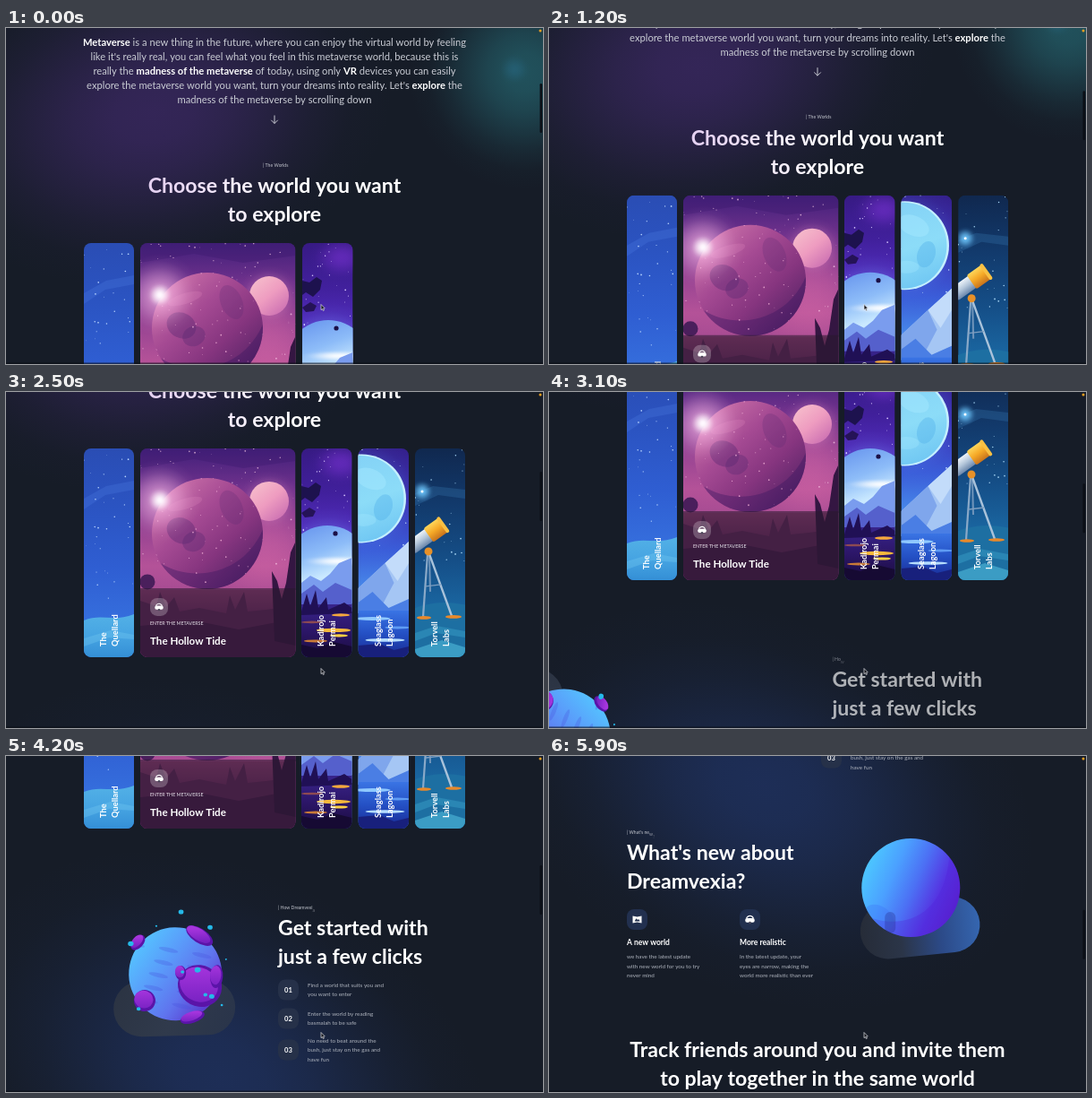
These frames come from a looping animation (600x375 px, 6000 ms). An HTML page with a canvas:

```html
<!DOCTYPE html>
<html lang="en">
<head>
<meta charset="utf-8">
<title>Scrolling worlds page</title>
<style>
html, body { margin: 0; width: 100%; height: 100%; overflow: hidden; background: #161c27; }
canvas { display: block; width: 600px; height: 375px; }
</style>
</head>
<body>
<canvas id="stage"></canvas>
<script>
const W = 600, H = 375, LOOP = 6000, STEP = 100, TAU = Math.PI * 2;
const canvas = document.getElementById('stage');
const c = canvas.getContext('2d');
const dpr = window.devicePixelRatio || 1;
canvas.width = W * dpr;
canvas.height = H * dpr;

// timing

const clamp = v => Math.max(0, Math.min(1, v));
const easeOut = p => 1 - Math.pow(1 - clamp(p), 1.6);

function spring(seconds, omega, zeta) {
  if (seconds <= 0) return 0;
  const wd = omega * Math.sqrt(1 - zeta * zeta), a = wd * seconds;
  return 1 - Math.exp(-zeta * omega * seconds) * (Math.cos(a) + zeta * omega / wd * Math.sin(a));
}

const scrollKeys = [[0, 0], [1200, 53.3], [2000, 112], [3100, 263], [4200, 392], [5000, 559], [5900, 718], [6000, 735]];

function scrollAt(t) {
  const k = scrollKeys;
  const slope = i => (k[i + 1][1] - k[i][1]) / (k[i + 1][0] - k[i][0]);
  const tangent = i => i === 0 ? slope(0) : i === k.length - 1 ? slope(i - 1) : (slope(i - 1) + slope(i)) / 2;
  let i = 0;
  while (i < k.length - 2 && t >= k[i + 1][0]) i++;
  const d = k[i + 1][0] - k[i][0], u = (t - k[i][0]) / d, v = 1 - u;
  return v * v * (1 + 2 * u) * k[i][1] + u * u * (3 - 2 * u) * k[i + 1][1]
    + d * u * v * (v * tangent(i) - u * tangent(i + 1));
}

// drawing helpers

function group(x, y, alpha, draw) {
  if (alpha <= 0) return;
  c.save();
  c.translate(x, y);
  c.globalAlpha *= clamp(alpha);
  draw();
  c.restore();
}

function insideDisc(x, y, r, draw) {
  c.save();
  c.beginPath();
  c.arc(x, y, r, 0, TAU);
  c.clip();
  draw();
  c.restore();
}

function ramp(x0, y0, x1, y1, ...colors) {
  const g = c.createLinearGradient(x0, y0, x1, y1);
  colors.forEach((color, i) => g.addColorStop(i / (colors.length - 1), color));
  return g;
}

function shape(fill, build) {
  c.beginPath();
  build();
  c.fillStyle = fill;
  c.fill();
}
const disc = (x, y, r, fill) => shape(fill, () => c.arc(x, y, r, 0, TAU));
const oval = (x, y, rx, ry, fill, turn = 0) => shape(fill, () => c.ellipse(x, y, rx, ry, turn, 0, TAU));
const box = (x, y, w, h, r, fill) => shape(fill, () => c.roundRect(x, y, w, h, r));
const poly = (fill, ...p) => shape(fill, () => {
  for (let i = 0; i < p.length; i += 2) c.lineTo(p[i], p[i + 1]);
  c.closePath();
});

function line(width, color, ...p) {
  c.beginPath();
  for (let i = 0; i < p.length; i += 2) c.lineTo(p[i], p[i + 1]);
  c.lineWidth = width;
  c.strokeStyle = color;
  c.stroke();
}

function glow(x, y, rx, ry, rgb, alpha, turn = 0) {
  c.save();
  c.translate(x, y);
  c.rotate(turn);
  c.scale(rx, ry);
  const g = c.createRadialGradient(0, 0, 0, 0, 0, 1);
  for (let i = 0; i <= 6; i++) {
    g.addColorStop(i / 6, `rgba(${rgb},${alpha * (1 + Math.cos(Math.PI * i / 6)) / 2})`);
  }
  disc(0, 0, 1, g);
  c.restore();
}

function stars(seed, count, w, h, color) {
  const rnd = () => (seed = (seed * 16807) % 2147483647) / 2147483647;
  for (let i = 0; i < count; i++) disc(rnd() * w, rnd() * h, 0.3 + rnd() * 0.6, color);
}

function font(size, weight) { c.font = `${weight} ${size}px Lato, sans-serif`; }

// y is the visual middle of the line
function text(str, x, y, size, weight = 400, color = '#fff', align = 'left') {
  font(size, weight);
  c.textAlign = align;
  c.fillStyle = color;
  c.fillText(str, x, y + size * 0.34);
}

// words between asterisks are bold
function richCentered(str, x, y, size, color) {
  const parts = str.split('*').map((s, i) => {
    font(size, i % 2 ? 700 : 400);
    return [s, i % 2, c.measureText(s).width];
  });
  let left = x - parts.reduce((sum, p) => sum + p[2], 0) / 2;
  for (const [s, bold, width] of parts) {
    text(s, left, y, size, bold ? 700 : 400, bold ? '#fff' : color);
    left += width;
  }
}

function typed(str, x, y, t, start) {
  [...str].forEach((ch, i) => {
    const e = Math.pow(clamp((t - start - 100 * i) / 300), 1.7);
    font(5.1, 400);
    const dx = c.measureText(str.slice(0, i)).width;
    group(x + dx, y + 7 * (1 - e), e, () => text(ch, 0, 0, 5.1, 400, '#c3c6ce'));
  });
}

const title = (lines, x, y, align, color) =>
  lines.forEach((s, i) => text(s, x, y + 32.2 * i, 23.1, 700, color, align));

function headset(x, y, s) {
  group(x, y, 1, () => {
    c.scale(s, s);
    c.beginPath();
    c.arc(0, 0, 4.3, Math.PI * 1.1, Math.PI * 1.9);
    c.lineWidth = 1.3;
    c.strokeStyle = '#fff';
    c.stroke();
    box(-5.5, -1.6, 11, 5, 2, '#fff');
    disc(0, 3.8, 1.4, '#4a4658');
  });
}

function pictureIcon(x, y) {
  poly('#fff', x - 5, y - 4, x, y - 3, x + 5, y - 4, x + 5, y + 4, x, y + 3, x - 5, y + 4);
  poly('#22304f', x - 3, y + 2, x - 1, y - 1.2, x + 0.5, y + 0.6, x + 1.6, y - 0.4, x + 3.2, y + 2);
}

// cards, 233 high

function snowCard(w) {
  box(0, 0, w, 233, 0, ramp(0, 0, 0, 200, '#2a4db4', '#2b54c2', '#2f5ed2', '#3670de'));
  poly('rgba(90,140,240,.2)', 0, 56, 25, 42, w, 36, w, 46, 24, 52, 0, 68);
  stars(31, 30, w, 170, '#b9d6ff');
  shape(ramp(0, 186, 0, 233, '#52b0e6', '#46a4e2', '#348fd6'), () => {
    c.moveTo(0, 192);
    c.bezierCurveTo(18, 184, 34, 194, w, 185);
    c.lineTo(w, 233);
    c.lineTo(0, 233);
  });
  poly('rgba(115,200,240,.35)', 0, 212, 30, 203, w, 208, w, 213, 28, 211, 0, 221);
}

function planetCard(w) {
  box(0, 0, w, 233, 0, ramp(0, 0, 0, 175, '#41207a', '#6f318c', '#944292', '#b45298', '#a04890'));
  poly('rgba(60,25,110,.4)', 0, 0, w, 0, w, 14, 115, 22, 60, 12, 0, 22);
  glow(140, 110, 70, 80, '225,110,170', 0.4);
  stars(77, 90, w, 150, 'rgba(255,210,235,.7)');
  glow(144, 59, 34, 34, '255,170,210', 0.5);
  disc(144, 59, 22, ramp(128, 40, 160, 78, '#f6bccb', '#ee9cc0', '#cc70b2'));
  disc(75, 95, 62, ramp(30, 50, 118, 144, '#c66ca6', '#a54a93', '#86357f', '#592468'));
  insideDisc(75, 95, 62, () => {
    oval(46, 92, 17, 14, 'rgba(85,38,112,.38)', 0.5);
    oval(60, 104, 13, 11, 'rgba(85,38,112,.34)', -0.4);
    oval(102, 66, 12, 20, 'rgba(85,38,112,.22)', -0.4);
    oval(50, 62, 20, 6, 'rgba(235,150,200,.18)', -0.3);
    shape('rgba(55,22,95,.38)', () => {
      c.arc(75, 95, 63, -0.1, 2.6);
      c.bezierCurveTo(60, 152, 118, 140, 138, 88);
    });
    stars(9, 60, 138, 150, 'rgba(255,190,225,.7)');
  });
  glow(22, 58, 46, 46, '255,190,235', 0.65);
  glow(22, 58, 15, 15, '255,250,255', 1);
  disc(8, 149, 8.5, '#4a1f5c');
  box(0, 158, w, 75, 0, ramp(0, 158, 0, 233, '#a04482', '#6d2a66', '#4a1d52'));
  poly('#672a62', 0, 233, 0, 170, 18, 176, 22, 160, 29, 177, 38, 166, 44, 182, 66, 178, 96, 184,
    100, 164, 106, 180, 116, 160, 120, 182, 140, 180, w, 176, w, 233);
  poly('#4a1c50', 0, 198, 60, 192, 110, 202, w, 190, w, 233, 0, 233);
  poly('#341642', 150, 215, 149, 190, 147, 137, 153, 148, 158, 168, 163, 150, 168, 116, w, 104, w, 220);
  box(0, 156, w, 77, 0, 'rgba(40,25,45,.55)');
  box(11, 167, 20, 20, 8, 'rgba(255,255,255,.24)');
  headset(21, 177, 0.85);
  text('ENTER THE METAVERSE', 11, 195.5, 5.3, 400, '#e9e3ec');
  text('The Hollow Tide', 11, 215, 11.6, 700);
}

function lavaCard(w) {
  box(0, 0, w, 233, 0, ramp(0, 0, 0, 150, '#371a84', '#41209c', '#5430c4', '#4f62de'));
  glow(44, 16, 36, 26, '120,50,210', 0.6);
  stars(53, 35, w, 110, '#d9c8ff');
  glow(30, 128, 60, 62, '120,170,255', 0.7);
  disc(29, 134, 48, ramp(5, 92, 34, 170, '#6f9df0', '#8dbcf8', '#cbeaff', '#86b4f4'));
  poly('#1d124e', 0, 42, 8, 44, 16, 38, 22, 42, 20, 52, 12, 60, 4, 55, 0, 58);
  poly('#251357', 0, 72, 9, 66, 16, 70, 13, 76, 4, 77);
  disc(38, 95, 2.6, '#1b1047');
  glow(42, 126, 44, 7, '255,255,255', 0.9);
  poly('#7a9cee', 0, 150, 10, 142, 22, 148, 32, 140, 42, 128, w, 122, w, 182, 0, 182);
  poly('#5560cc', 0, 162, 14, 152, 24, 160, 38, 150, w, 158, w, 182, 0, 182);
  box(0, 174, w, 59, 0, ramp(0, 174, 0, 233, '#38248c', '#2c1668', '#1a0c40'));
  poly('#201055', 0, 182, 6, 162, 10, 176, 16, 158, 19, 178, 28, 166, 30, 180, 48, 172, w, 178, w, 184, 0, 186);
  oval(44, 186, 10, 1.7, '#f4a83c');
  oval(12, 194, 12, 1.3, '#8d4a52');
  oval(36, 203, 19, 2.2, '#f7b93c');
  oval(42, 209, 10, 1.6, '#ffd143');
  oval(16, 215, 13, 1.5, '#c97a38');
  poly('#160a33', 0, 219, 18, 223, 36, 216, w, 221, w, 233, 0, 233);
}

function iceCard(w) {
  box(0, 0, w, 233, 0, ramp(0, 0, 0, 170, '#34208c', '#3a2cae', '#3a5cd8', '#4c98f0'));
  stars(19, 22, w, 120, '#cfe6ff');
  glow(4, 56, 72, 72, '90,150,255', 0.6);
  disc(4, 56, 49.5, '#c5f0ff');
  disc(3, 56, 48, ramp(0, 8, 36, 104, '#84d2f6', '#8cdcf8', '#6cc4f2'));
  insideDisc(3, 56, 48, () => {
    oval(14, 34, 18, 11, 'rgba(170,235,255,.4)', 0.4);
    oval(28, 66, 10, 15, 'rgba(80,175,232,.4)', 0.3);
    oval(6, 80, 14, 7, 'rgba(170,235,255,.3)');
  });
  poly('#a5c6f4', 0, 156, 30, 128, w, 104, w, 184, 0, 184);
  poly('#7fa6ec', 0, 156, 30, 128, 40, 150, 22, 184, 0, 184);
  poly('#c3dcfa', 30, 128, w, 104, w, 128, 44, 148);
  poly('#4a7ee4', 0, 172, 16, 160, 34, 178, w, 168, w, 190, 0, 190);
  box(0, 181, w, 52, 0, ramp(0, 181, 0, 233, '#3a74e4', '#2450c4', '#182a94'));
  oval(16, 190, 20, 2, '#8fc9ff');
  oval(44, 200, 14, 1.5, '#5f9cf4');
  oval(30, 214, 22, 1.8, '#b4dcff');
  poly('#18207c', 0, 220, 24, 218, 40, 225, w, 221, w, 233, 0, 233);
}

function telescopeCard(w) {
  box(0, 0, w, 233, 0, ramp(0, 0, 0, 190, '#10284f', '#123a6c', '#154f88', '#1b6ba6'));
  poly('rgba(60,130,190,.25)', 0, 50, 20, 42, w, 46, w, 56, 26, 52, 0, 64);
  stars(41, 24, w, 140, '#a5d4f4');
  glow(8, 48, 13, 13, '110,200,255', 0.9);
  disc(8, 48, 1.5, '#fff');
  oval(34, 216, 66, 44, '#1d6fa2');
  poly('#2a86b4', 0, 206, 24, 198, w, 204, w, 211, 24, 206, 0, 215);
  poly('#3b9cc4', 0, 224, 30, 214, w, 222, w, 233, 0, 233);
  line(2, '#6f94ba', 16, 118, 17, 160);
  line(2.2, '#8aa9c8', 14, 118, 9, 188);
  line(2.4, '#a9c2da', 16, 118, 41, 187);
  line(1.3, '#7f9fc0', 12, 154, 29, 152);
  oval(10, 189, 8, 1.8, '#e8892b');
  oval(43, 188, 9, 1.8, '#e8892b');
  disc(15, 115, 4.5, '#e69028');
  group(15, 97, 1, () => {
    c.rotate(-0.62);
    box(-24, -8, 26, 16, 2, ramp(0, -8, 0, 8, '#eef4fa', '#b3c6da', '#6b87ab'));
    box(0, -9.5, 20, 19, 2, ramp(0, -9.5, 0, 9.5, '#ffd65a', '#f5a826', '#c8731d'));
    box(18, -10.5, 4, 21, 2, '#f9c043');
  });
}

const cards = [
  { x: 87, w: 56, art: snowCard, label: ['The', 'Quellard'] },
  { x: 150, w: 173.5, art: planetCard },
  { x: 330, w: 56.5, art: lavaCard, label: ['Kadirojo', 'Permai'] },
  { x: 393.5, w: 56.5, art: iceCard, label: ['Seaglass', 'Lagoon'] },
  { x: 457, w: 56, art: telescopeCard, label: ['Torvell', 'Labs'] }
];

function drawCards(t) {
  cards.forEach(({ x, w, art, label }, i) => {
    const p = spring((t - 120 - 500 * (i - 3)) / 1000, 12.5, 0.75);
    group(x - 36 * (1 - p), 240, p, () => {
      c.beginPath();
      c.roundRect(0, 0, w, 233, 8);
      c.clip();
      art(w);
      if (!label) return;
      label.forEach((s, n) => group(22 + 13 * n, 221, 1, () => {
        c.rotate(-Math.PI / 2);
        text(s, 0, 0, 9.3, 700);
      }));
    });
  });
}

// floating planets, drawn around their pivot

function craterPlanet() {
  c.translate(11, 0);
  box(-70, 7, 136, 62, 31, ramp(-70, 10, 66, 68, '#2b3342', '#303a4c', '#29344a'));
  disc(0, 0, 52, ramp(-44, -30, 40, 38, '#55c2ff', '#5a9cfa', '#5f74ee', '#5a35cc'));
  insideDisc(0, 0, 52, () => {
    for (let i = 0; i < 12; i++) {
      oval(-44 + (i * 37) % 80, -34 + i * 7, 11, 2.4, 'rgba(70,80,220,.28)', 0.25);
    }
  });
  const crater = (x, y, rx, ry, turn) => {
    oval(x, y, rx, ry, '#5a14a8', turn);
    oval(x - 1, y - 1.5, rx * 0.88, ry * 0.82, ramp(x, y - ry, x, y + ry, '#a635dd', '#7420c0'), turn);
  };
  crater(27, 14, 25, 23, 0.5);
  crater(28, -42, 17, 8, 0.6);
  crater(-41, -36, 10, 6, -0.8);
  crater(-35, 29, 12, 12, 0.4);
  crater(18, 49, 14, 6, -0.3);
  crater(46, 4, 7, 13, 0.1);
  crater(6, -1, 6, 8, 0);
  [[8, -69, 2.5], [40, -51, 2.5], [-49, -35, 2.8], [51, 36, 1.2], [-42, 38, 2], [25, -4, 3],
    [33, 24, 2], [40, 26, 2.6], [-20, -54, 1], [57, -15, 0.9], [8, -2, 1.8]]
    .forEach(([x, y, r]) => oval(x, y, r * 1.15, r, '#25b9e9'));
}

function smoothPlanet() {
  c.rotate(0.06);
  c.save();
  c.rotate(-0.1);
  box(-67, 3, 134, 62, 31, ramp(-67, 0, 67, 0, '#262c38', '#2b3548', '#2c4a88', '#3566b0'));
  c.restore();
  disc(-7, -11, 55, ramp(-54, -32, 46, 12, '#4cc2ff', '#4ba0ff', '#4c70f4', '#5535e2', '#5a1fcb'));
  insideDisc(-7, -11, 55, () => {
    shape('rgba(80,30,215,.3)', () => {
      c.arc(-7, -11, 56, -0.7, 2.5);
      c.bezierCurveTo(-20, 34, 30, 26, 36, -46);
    });
    oval(-42, 22, 18, 12, 'rgba(60,110,245,.3)', 0.6);
  });
  box(-36, 16, 12, 24, 6, 'rgba(35,40,130,.3)');
}

function floating(x, y, shift, t, start, draw) {
  const left = 1 - spring((t - start) / 1000, 5.2, 0.75);
  group(x + shift * left, y, 1, () => {
    c.rotate(TAU / 3 * left);
    draw();
  });
}

// page sections

const intro = [
  '*Metaverse* is a new thing in the future, where you can enjoy the virtual world by feeling',
  "like it's really real, you can feel what you feel in this metaverse world, because this is",
  'really the *madness of the metaverse* of today, using only *VR* devices you can easily',
  "explore the metaverse world you want, turn your dreams into reality. Let's *explore* the",
  'madness of the metaverse by scrolling down'
];
const steps = [
  [653, '01', ['Find a world that suits you and', 'you want to enter']],
  [685, '02', ['Enter the world by reading', 'basmalah to be safe']],
  [720, '03', ['No need to beat around the', 'bush, just stay on the gas and', 'have fun']]
];
const news = [
  [87, 'A new world', ['we have the latest update', 'with new world for you to try', 'never mind']],
  [213, 'More realistic', ['In the latest update, your', 'eyes are narrow, making the', 'world more realistic than ever']]
];

function drawIntro(t) {
  const gone = t - 1872;
  group(0, 36 * spring(gone / 1000, 22.4, 0.56), 1 - clamp(gone / 300), () => {
    intro.forEach((s, i) => richCentered(s, 300, 16.5 + 16 * i, 11.2, '#c9ccd4'));
    line(0.9, '#d8dae0', 300, 97.5, 300, 106.5);
    line(0.9, '#d8dae0', 296.3, 102.8, 300, 106.5, 303.7, 102.8);
  });
}

function drawSteps(t) {
  const p = easeOut((t - 2614) / 1000);
  group(36 * (1 - p), 0, p, () => {
    typed('| How Dreamvexia Works', 304, 561, t, 2500);
    title(['Get started with', 'just a few clicks'], 304, 584);
    for (const [y, number, lines] of steps) {
      box(304, y - 11.5, 23, 23, 8, '#263149');
      text(number, 315.5, y, 7.6, 700, '#fff', 'center');
      lines.forEach((s, i) => text(s, 337, y + (i - (lines.length - 1) / 2) * 10.6, 6.3, 400, '#aeb3bd'));
    }
  });
}

function drawNews(t) {
  const p = easeOut((t - 4681) / 1000);
  group(-36 * (1 - p), 0, p, () => {
    typed("| What's new?", 87, 803, t, 4550);
    title(["What's new about", 'Dreamvexia?'], 87, 826);
    news.forEach(([x, name, lines], i) => {
      box(x, 889, 23, 23, 8, '#22304f');
      if (i) headset(x + 11.5, 900.5, 0.95);
      else pictureIcon(x + 11.5, 900.5);
      text(name, x, 926, 8.5, 700);
      lines.forEach((s, n) => text(s, x, 942 + 10.6 * n, 6.3, 400, '#aeb3bd'));
    });
  });
}

function drawPage(t) {
  glow(165, 95, 270, 190, '78,46,130', 0.53, -0.2);
  glow(580, 50, 130, 130, '42,125,135', 0.55);
  glow(568, 46, 18, 18, '45,125,165', 0.3);
  glow(240, 750, 320, 230, '36,62,130', 0.52, 0.5);
  drawIntro(t);
  typed('| The Worlds', 287, 153, t, -2000);
  title(['Choose the world you want', 'to explore'], 300, 176.3, 'center',
    ramp(150, 0, 320, 0, '#e2cdf0', '#f1e6f8', '#ffffff'));
  drawCards(t);
  floating(176, 635.5, -193, t, 2960, craterPlanet);
  drawSteps(t);
  drawNews(t);
  floating(417, 876, 203, t, 5000, smoothPlanet);
  title(['Track friends around you and invite them', 'to play together in the same world'], 300, 1046, 'center');
}

function drawOverlay(scroll) {
  box(596.5, 62 + scroll * 0.153, 2.6, 55, 1.3, '#0b0f16');
  box(0, 373.5, W, 1.5, 0, 'rgba(8,11,18,.6)');
  disc(597, 3, 1.5, '#f0a020');
  c.beginPath();
  [352, 308.5, 352, 314.6, 353.4, 313.5, 354.4, 315.6, 355.4, 315.1, 354.5, 313, 356.2, 312.8]
    .forEach((v, i, p) => i % 2 && c.lineTo(p[i - 1], v));
  c.closePath();
  c.fillStyle = '#14161c';
  c.fill();
  c.lineWidth = 0.7;
  c.strokeStyle = '#e4e6ea';
  c.stroke();
}

function render(t) {
  c.setTransform(dpr, 0, 0, dpr, 0, 0);
  box(0, 0, W, H, 0, '#161c27');
  const scroll = scrollAt(t);
  group(0, -scroll, 1, () => drawPage(t));
  drawOverlay(scroll);
}

const begin = performance.now();
let shown = -1;
function tick() {
  const t = Math.floor((performance.now() - begin) % LOOP / STEP) * STEP;
  if (t !== shown) render(shown = t);
  requestAnimationFrame(tick);
}
tick();
</script>
</body>
</html>
```
